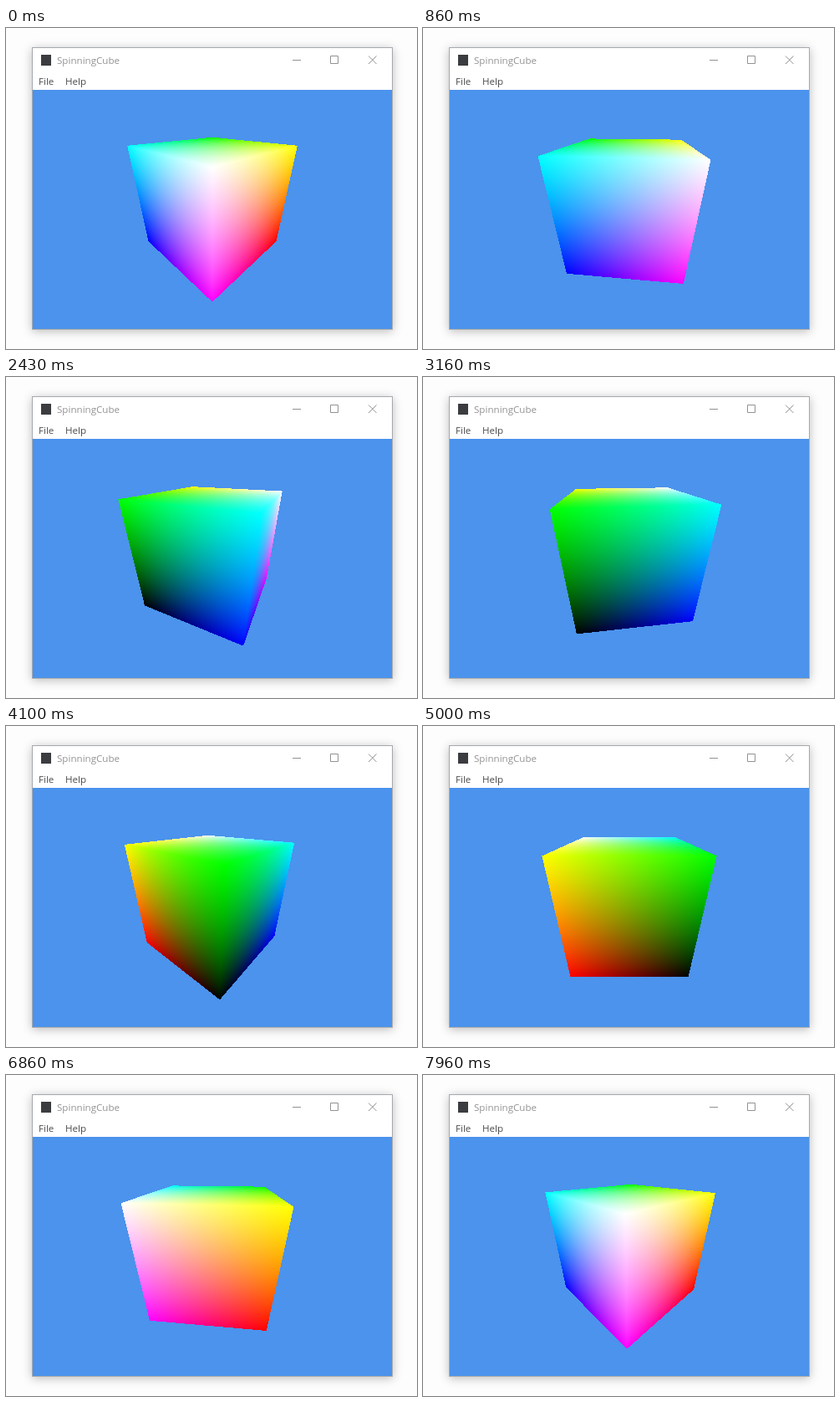
These frames come from a looping animation (492x384 px, 8 s). An HTML page with a canvas:

```html
<!DOCTYPE html>
<html lang="en">
<head>
<meta charset="utf-8">
<title>SpinningCube</title>
<style>
  html, body { margin: 0; width: 100%; height: 100%; overflow: hidden; background: #fdfdfd; }
  .window {
    position: absolute; left: 31px; top: 23px; width: 430px; height: 336px;
    border: 1px solid #a5a8ad; background: #fff;
    box-shadow: 0 2px 11px rgba(0, 0, 0, .26);
    font: 11.6px/16px "Open Sans", "Noto Sans", sans-serif; color: #4c4c4c;
  }
  .window > * { position: absolute; }
  .title { left: 29px; top: 7px; color: #929292; }
  .icon { left: 10px; top: 8px; width: 12px; height: 13px; background: #3a3c40; }
  .controls { left: 310px; top: 8px; fill: none; stroke: #929292; }
  .view { left: 0; top: 50px; width: 430px; height: 286px; background: #4b93ec; }
</style>
</head>
<body>
<div class="window">
  <div class="icon"></div>
  <div class="title">SpinningCube</div>
  <svg class="controls" width="106" height="14">
    <path d="M1 6.5H11M46.5 1.5h9v9h-9zM92 1.5l9.5 9.5M101.5 1.5L92 11"/>
  </svg>
  <div style="left:7px; top:32px">File</div>
  <div style="left:39px; top:32px">Help</div>
  <canvas class="view" width="430" height="286"></canvas>
</div>
<script>
const ctx = document.querySelector('canvas').getContext('2d');
// Part of the view that the cube can reach
const area = { x: 96, y: 50, w: 238, h: 208 };
const image = ctx.createImageData(area.w, area.h);
const focal = 143 / Math.tan(35 * Math.PI / 180);
const eye = [0, 0.7, 1.5];
const look = { y: -0.8 / 1.7, z: -1.5 / 1.7 };
const STEP = 1000 / 30;

// Casts one ray per pixel; the colour is the hit point inside the unit cube
function drawCube(angle) {
  const c = Math.cos(angle), s = Math.sin(angle);
  const toCube = (x, y, z) => [x * c - z * s, y, x * s + z * c];
  const from = toCube(...eye);
  const data = image.data;
  data.fill(0);
  for (let j = 0, p = 0; j < area.h; j++) {
    const v = (143 - area.y - j - 0.5) / focal;
    for (let i = 0; i < area.w; i++, p += 4) {
      const u = (area.x + i + 0.5 - 215) / focal;
      const ray = toCube(u, look.y - look.z * v, look.z + look.y * v);
      let near = 0, far = Infinity;
      for (let k = 0; k < 3; k++) {
        const a = (-0.5 - from[k]) / ray[k], b = (0.5 - from[k]) / ray[k];
        near = Math.max(near, Math.min(a, b));
        far = Math.min(far, Math.max(a, b));
      }
      if (near > far) continue;
      for (let k = 0; k < 3; k++) data[p + k] = 255 * (from[k] + ray[k] * near + 0.5);
      data[p + 3] = 255;
    }
  }
  ctx.putImageData(image, area.x, area.y);
}

let shown = -1;
function tick() {
  const time = performance.now() % 8000;
  // 30 steps a second, each starting on a multiple of 10 ms
  const step = Math.floor((Math.floor(time / 10) * 10 + 9) / STEP);
  if (step !== shown) drawCube((step * 1.5 - 45) * Math.PI / 180);
  shown = step;
  requestAnimationFrame(tick);
}
tick();
</script>
</body>
</html>
```
